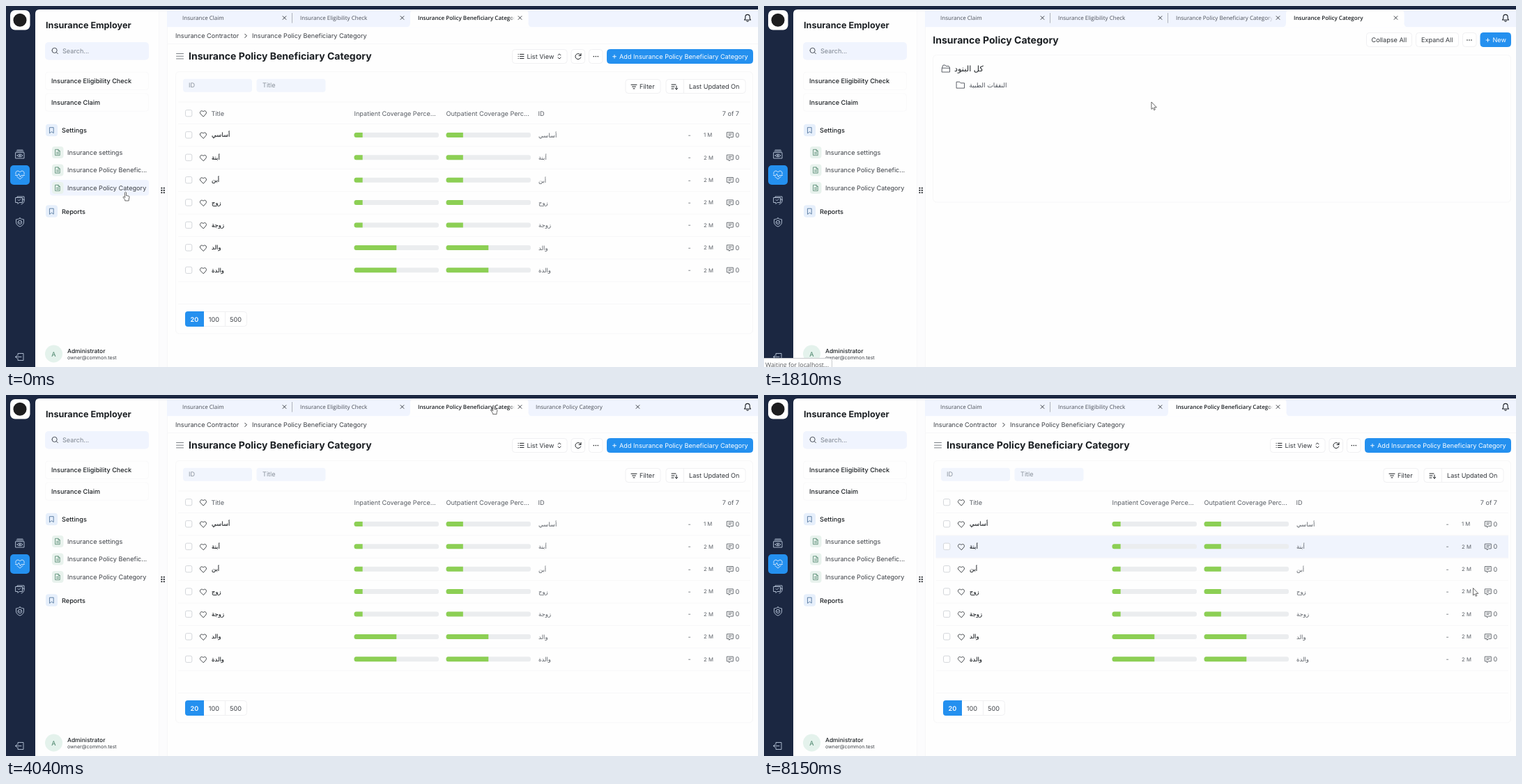
These frames come from a looping animation (1079 by 519 pixels, 8200 ms). An HTML page:

```html
<!DOCTYPE html>
<html lang="en">
<head>
<meta charset="utf-8">
<title>Insurance categories</title>
<style>
  html, body { margin: 0; width: 100%; height: 100%; overflow: hidden; background: #fefefe; }
  svg { display: block; width: 100%; height: 100%; }
  text { font-family: Inter, sans-serif; text-rendering: geometricPrecision; white-space: pre; }
  .ui { font-family: "Open Sans", "Noto Sans", sans-serif; }
  .ar { font-family: "DejaVu Sans", sans-serif; }
</style>
</head>
<body>
<svg id="stage" viewBox="0 0 1079 519" xmlns="http://www.w3.org/2000/svg"></svg>
<script>
const LOOP = 8200, TAB_X = 242, TAB_W = 169;
const INK = '#1c2024', GREY = '#5a5f66', BLUE = '#2490ef', PALE = '#f0f4fe', NAVY = '#1b2741';
const LINE = '#f7f7f8', EDGE = '#f0f0f2';

// Drawing helpers; text is placed by its left edge and the middle of its capitals.
const text = (x, y, str, { size = 9.13, fill = INK, more = '' } = {}) =>
  `<text x="${x}" y="${(y + size * 0.364).toFixed(2)}" font-size="${size}" fill="${fill}" ${more}>${str}</text>`;
const rect = (x, y, w, h, r, fill, stroke = 'none') =>
  `<rect x="${x}" y="${y}" width="${w}" height="${h}" rx="${r}" fill="${fill}" stroke="${stroke}"/>`;
const icon = (x, y, d, stroke = GREY, width = 0.9, fill = 'none') =>
  `<path transform="translate(${x} ${y})" d="${d}" fill="${fill}" stroke="${stroke}" stroke-width="${width}" stroke-linecap="round" stroke-linejoin="round"/>`;
const rule = (x, y, w) => rect(x, y, w, 1, 0, LINE);
const group = (id, body) => `<g id="${id}">${body}</g>`;
const bold = 'font-weight="700"', semi = 'font-weight="600"', medium = 'font-weight="500"', arabic = 'class="ar"';

const ICONS = {
  heart: 'M0 4.5L-4 .5C-6-2-2.5-5.5 0-2.5C2.5-5.5 6-2 4 .5Z',
  file: 'M-3-4.2H1L3.2-2V4.2H-3ZM1-4.2V-2H3.2M-1.4 0H1.6M-1.4 2H1.6',
  bookmark: 'M-2.7-4H2.7V4L0 2L-2.7 4Z',
  comment: 'M-4.3-4H4.3V2.8H.8L-1.6 4.6V2.8H-4.3ZM-2.2-1.7H2.2M-2.2.4H.8',
  cross: 'M-2.4-2.4L2.4 2.4M2.4-2.4L-2.4 2.4',
  plus: 'M-2.4 0H2.4M0-2.4V2.4',
  shield: 'M0-6C2-4.5 4-4.2 5.5-4.2V0C5.5 3 3 5 0 6.2C-3 5-5.5 3-5.5 0V-4.2C-4-4.2-2-4.5 0-6Z'
};

function button(x, y, w, str, tx, blue) {
  const fill = blue ? '#fff' : '#33373c';
  return rect(x + .5, y + .5, w - 1, 20, 4, blue ? BLUE : '#fff', blue ? BLUE : EDGE) +
    text(tx, y + 10.6, str, { fill, more: 'font-weight="420"' });
}
const dots = (x, y) => [-3, 0, 3].map(d => `<circle cx="${x + d}" cy="${y}" r=".8" fill="${INK}"/>`).join('');

function rail() {
  const pale = '#b9c7da';
  return rect(0, 0, 1079, 5, 0, NAVY) + rect(0, 0, 52, 519, 0, NAVY) +
    `<path d="M42 519V11Q42 5 48 5H219V519Z" fill="#fefefe"/>` +
    rect(6, 6, 28.5, 28.5, 7, '#fff') + '<circle cx="20" cy="20.3" r="9.5" fill="#1d1d1f"/>' +
    rect(6, 229, 28, 28, 5, BLUE) +
    icon(20, 213, 'M-4-6H4M-5-4.2H5M-6-2.3H6V6H-6ZM-4 2Q0-2 4 2Q0 6-4 2ZM-1 2a1 1 0 1 0 2 0a1 1 0 1 0-2 0', pale) +
    icon(20, 243, 'M-6-1C-7.5-6-2-7.5 0-4C2-7.5 7.5-6 6-1M-4.5 2L0 6L4.5 2M-6.5.5H-3L-1.5-2L.5 3L2 .5H6.5', '#d8eafd') +
    icon(20, 279, 'M-4-3.5V-5H6V0M-6-3.5H3.5V3.5H-1L-3 5.5V3.5H-6ZM-3-.5L-1.5 1L1-1.5M3.5-1H6V1C6 3.5 4.5 5 2 6', pale) +
    icon(20, 311, ICONS.shield, pale) +
    icon(20, 311, 'M-2.8 0a2.8 2.8 0 1 0 5.6 0a2.8 2.8 0 1 0-5.6 0M-1.2 0L-.3.9L1.3-.8', pale) +
    icon(19.5, 504.5, 'M-2.5-2V-5H5.5V5H-2.5V2M2.5 0H-6M-4-2L-6 0L-4 2', pale);
}

function sidebar() {
  const head = (y, str) => rect(57, y - 9, 17, 17.5, 4, '#e6effb') +
    icon(65.5, y, ICONS.bookmark, '#54779d') + text(80, y, str, { more: medium });
  const item = (y, str) => rect(66, y - 8.5, 16.5, 17, 4, '#e8f2ed') +
    icon(74, y, ICONS.file, '#5f917a') + text(88, y, str, { fill: '#3d4147' });
  const card = (y, str) => rect(56.5, y - 12.5, 148, 25.5, 4, '#fefefe', '#f9f9fa') +
    text(65, y, str, { more: medium });
  const grip = [223.4, 226.8].map(x => [261.7, 265, 268.3].map(y =>
    rect(x - 1, y - 1, 2, 2, .6, '#25282c')).join('')).join('');
  return text(57, 27.3, 'Insurance Employer', { size: 12.645, more: bold }) +
    rect(56, 52, 149, 25.5, 5, PALE) +
    icon(70, 64.5, 'M-4-.6a3.6 3.6 0 1 0 7.2 0a3.6 3.6 0 1 0-7.2 0M2.2 2L4.4 4.2', '#4b5058', 1) +
    text(81, 64.6, 'Search...', { fill: '#7d858f' }) +
    card(107.5, 'Insurance Eligibility Check') + card(138.3, 'Insurance Claim') +
    head(178.7, 'Settings') +
    group('itemHover', rect(63, 250, 142, 22.5, 4, PALE)) +
    item(210.5, 'Insurance settings') + item(236, 'Insurance Policy Benefic...') +
    item(261.5, 'Insurance Policy Category') + head(295.2, 'Reports') +
    '<circle cx="68.5" cy="500" r="12.5" fill="#e4f2ec"/>' +
    text(68.5, 500.2, 'A', { fill: '#478268', more: 'text-anchor="middle"' }) +
    text(88, 495.7, 'Administrator', { size: 8.43, more: medium }) +
    text(88, 505.6, 'owner@common.test', { size: 7.03, fill: '#3d4147' }) +
    rect(219, 5, 12, 514, 0, '#fcfcfd') + rect(219, 5, .7, 514, 0, '#f5f5f7') +
    rect(231, 30, .7, 489, 0, '#f3f3f5') + grip;
}

const tabNames = ['Insurance Claim', 'Insurance Eligibility Check',
  'Insurance Policy Beneficiary Category', 'Insurance Policy Category'];

function tabBar() {
  const shape = `M-6 25.5Q0 25.5 0 19.5V6Q0 .5 5.5 .5H${TAB_W - 5}Q${TAB_W + .5} .5 ${TAB_W + .5} 6V19.5Q${TAB_W + .5} 25.5 ${TAB_W + 6.5} 25.5Z`;
  const tab = (name, i) => group('tab' + i,
    `<path d="${shape}"/>` +
    `<g mask="url(#fade)">${text(11, 12, name, { size: 8.03, more: 'class="ui"' })}</g>` +
    icon(157.5, 12, ICONS.cross, '#3c4046', 1));
  const seps = [1, 2].map(i => group('sep' + i, rect(TAB_X + TAB_W * i - .9, 10, .9, 14.5, 0, '#a9adb5'))).join('');
  return `<defs>
    <linearGradient id="edge" gradientUnits="userSpaceOnUse" x1="142" x2="150"><stop stop-color="#fff"/><stop offset="1" stop-color="#000"/></linearGradient>
    <mask id="fade" maskUnits="userSpaceOnUse" x="0" y="0" width="160" height="26"><rect width="160" height="26" fill="url(#edge)"/></mask>
    <clipPath id="bar"><rect x="231" y="5" width="848" height="25.5"/></clipPath></defs>
    <g clip-path="url(#bar)">${rect(231, 5, 848, 25.5, 0, PALE)}${tabNames.map(tab).join('')}${seps}</g>` +
    icon(1064, 17, 'M-4.5 3H4.5L3.2 1V-1.2C3.2-5.8-3.2-5.8-3.2-1.2V1ZM-1.2 4.6Q0 5.8 1.2 4.6', INK, 1.1);
}

const people = ['أساسي', 'أبنة', 'أبن', 'زوج', 'زوجة', 'والد', 'والدة'];

function listRow(name, i) {
  const y = 185.4 + 32.4 * i;
  const bar = (x, part) => rect(x, y - 3.5, 121.5, 7, 3, '#ebedef') +
    `<path d="M${x + 121.5 * part} ${y - 3.5}H${x + 3}a3 3.5 0 0 0 0 7H${x + 121.5 * part}Z" fill="#8ccf54"/>`;
  return rect(257.5, y - 4.7, 9.3, 9.3, 2, '#fff', '#d3d6da') + icon(283, y + .3, ICONS.heart, '#33373c') +
    text(295, y, name, { size: 8.5, more: arabic + ` stroke="${INK}" stroke-width=".15"` }) +
    bar(499.5, i < 5 ? .1 : .5) + bar(631.5, i < 5 ? .2 : .5) +
    text(764, y + .4, name, { size: 8.5, fill: GREY, more: arabic }) +
    text(978.5, y, '-', { fill: GREY }) +
    text(1001, y, (i ? 2 : 1) + ' M', { size: 7.73, fill: GREY }) +
    icon(1039, y + .3, ICONS.comment) + text(1046.5, y, '0', { fill: GREY }) + rule(247, y + 16, 821);
}

function listPage() {
  const head = { fill: GREY }, hint = { fill: '#8a929c' };
  return text(243, 42.7, 'Insurance Contractor', { fill: '#3d4147' }) +
    icon(344, 42.9, 'M-1.2-2.6L1.4 0L-1.2 2.6', INK) +
    text(353, 42.7, 'Insurance Policy Beneficiary Category', { fill: '#3d4147' }) + rule(231, 54, 848) +
    icon(249.5, 72.2, 'M-5-3.7H5M-5 0H5M-5 3.7H5', '#6c7279') +
    text(262, 72.2, 'Insurance Policy Beneficiary Category', { size: 14.05, more: bold }) +
    button(726, 62, 79.5, 'List View', 747.5) +
    icon(739, 72.4, 'M-1.5-3H4M-1.5 0H4M-1.5 3H4M-4-3h.3M-4 0h.3M-4 3h.3', INK, 1) +
    icon(794, 72.4, 'M-2-1.6L0-3.6L2-1.6M-2 1.6L0 3.6L2 1.6', INK) +
    button(810.5, 62, 20.5, '', 0) + icon(821, 72.4, 'M3.8-1A4 4 0 1 0 3.7 1.6M4-4V-1H1', INK, 1) +
    button(836, 62, 20.5, '', 0) + dots(846.3, 72.6) +
    button(862, 62, 210, 'Add Insurance Policy Beneficiary Category', 880, true) +
    icon(873, 72.7, ICONS.plus, '#fff') +
    rect(243.5, 94.5, 828, 376.5, 5, '#fefefe', LINE) +
    rect(254, 104.7, 99, 19, 4, '#f1f5fd') + text(262, 114, 'ID', hint) +
    rect(359.5, 104.7, 99, 19, 4, '#f1f5fd') + text(368, 114, 'Title', hint) +
    button(888.5, 105, 51, 'Filter', 909) + icon(901, 116, 'M-4-2.8H4M-2.5 0H2.5M-1 2.8H1', INK, 1) +
    button(946.5, 105, 115, 'Last Updated On', 980) + rect(972, 105.5, 1, 20, 0, EDGE) +
    icon(959, 116, 'M-4-3H2M-4 0H0M-4 3H-1M3-1V4M1.2 2.3L3 4L4.8 2.3', INK, 1) +
    rule(247, 137.5, 821) +
    rect(257.5, 149.5, 9.3, 9.3, 2, '#fff', '#d3d6da') + icon(283, 154.4, ICONS.heart, '#33373c') +
    text(294.5, 154.2, 'Title', head) + text(499.5, 154.2, 'Inpatient Coverage Perce...', head) +
    text(631.5, 154.2, 'Outpatient Coverage Perc...', head) + text(763.5, 154.2, 'ID', head) +
    text(1052, 154.2, '7 of 7', { fill: GREY, more: 'text-anchor="end"' }) + rule(247, 169, 821) +
    group('rowHover', rect(246.5, 202, 821.5, 32, 0, '#f0f4fd')) +
    people.map(listRow).join('') + rule(247, 428, 821) +
    rect(257.5, 439.5, 88, 21, 4, '#fff', EDGE) + rect(314, 440, 1, 20, 0, EDGE) +
    `<path d="M284 439V461H261Q257 461 257 457V443Q257 439 261 439Z" fill="${BLUE}"/>` +
    text(264.6, 450.2, '20', { fill: '#fff', more: semi }) +
    text(290.7, 450.2, '100', { fill: '#3d4147' }) + text(321, 450.2, '500', { fill: '#3d4147' });
}

function treePage() {
  return text(242.3, 48.4, 'Insurance Policy Category', { size: 14.05, more: bold }) +
    button(864, 38, 66, 'Collapse All', 871.5) + button(935, 38, 62, 'Expand All', 943) +
    button(1002, 38, 20.5, '', 0) + dots(1012, 49) +
    button(1027.5, 38, 44.5, 'New', 1045.5, true) + icon(1038.5, 49, ICONS.plus, '#fff') +
    rect(242.5, 70.5, 829, 211.5, 5, '#fefefe', LINE) +
    icon(261, 90, 'M-5.5-1L-4-5H-1L0-3.6H4.2L5.5-1V5H-5.5ZM-5.5-.8H5.5', '#4b5058') +
    text(273, 89.8, 'كل البنود', { size: 11.3, more: arabic }) +
    icon(282, 113.6, 'M-5.5-4.5H-1.2L.2-2.8H5.5V4.5H-5.5Z', '#4b5058') +
    text(294.5, 113.8, 'النفقات الطبية', { size: 9, fill: '#4b5058', more: arabic });
}

const statusBubble = '<path d="M-1 506.5H94Q97.5 506.5 97.5 510V520H-1Z" fill="#fff" stroke="#c9cbce"/>' +
  text(2, 515.9, 'Waiting for localhost...', { size: 8.8, fill: '#55585c', more: 'class="ui"' });
const pointer = group('arrow', icon(0, 0, 'M0 0V10L2.3 8L3.8 11.3L5.4 10.6L4 7.4H7Z', '#444', .8, '#fff')) +
  group('hand', icon(0, 0, 'M-1 1Q0-.6 1 1V5.5L4.5 6.2Q5.8 6.6 5.5 8L4.7 11V13H-.8V11.5L-3.4 8.2Q-3.6 6.8-2.2 7.2L-1 8.2Z', '#444', .8, '#fff'));

document.getElementById('stage').innerHTML = rect(0, 0, 1079, 519, 0, '#fefefe') + rail() + sidebar() +
  tabBar() + group('list', listPage()) + group('tree', treePage()) +
  group('status', statusBubble) + group('cursor', pointer);

const el = id => document.getElementById(id);
const show = (id, on) => el(id).setAttribute('visibility', on ? 'inherit' : 'hidden');
const clamp = v => Math.min(1, Math.max(0, v));
const smooth = v => (v = clamp(v), v * v * (3 - 2 * v));

// Pointer tip: time, x, y
const path = [
  [0, 171.5, 267], [1200, 171.5, 267], [1420, 286.5, 261], [2010, 693, 76], [2080, 693, 76],
  [2630, 686, 15], [4039, 686, 15], [4040, 699, 14.5], [4450, 850, 60], [4860, 892, 16],
  [5190, 892, 16], [5500, 850, 58], [5940, 809, 29], [8069, 809, 29], [8070, 955, 213],
  [8149, 955, 213], [8150, 1017.5, 278], [LOOP, 1017.5, 278]
];

function tipAt(t) {
  const i = path.findIndex(p => p[0] > t);
  const [t0, x0, y0] = path[i - 1], [t1, x1, y1] = path[i];
  const k = (t - t0) / (t1 - t0);
  return [x0 + (x1 - x0) * k, y0 + (y1 - y0) * k];
}

function draw(t) {
  const opened = t >= 650 && t < 5230;
  const active = t >= 650 && t < 3090 ? 3 : 2;
  const [x, y] = tipAt(t);
  const over = y < 30 ? Math.floor((x - TAB_X) / TAB_W) : -1;
  const onTab = over >= 0 && over < (opened ? 4 : 3);
  const onItem = x < 205 && y > 250 && y < 272.5;

  tabNames.forEach((_, i) => {
    const tab = el('tab' + i), on = i === active, label = tab.querySelector('text');
    const drop = i === 3 ? 7 * (1 - smooth((t - 700) / 130)) : 0;
    tab.setAttribute('transform', `translate(${TAB_X + TAB_W * i} ${5 + drop})`);
    tab.firstChild.setAttribute('fill', on ? '#fefefe' : onTab && i === over ? '#f7f9fe' : 'none');
    label.setAttribute('font-weight', on ? 600 : 400);
    label.setAttribute('fill', on ? INK : '#4a4f57');
  });
  show('tab3', opened);
  show('sep2', active === 3 && !(onTab && over === 2));
  show('list', active === 2);
  show('tree', active === 3 && t >= 1800);
  show('itemHover', onItem);
  show('rowHover', t >= 8070);
  el('status').setAttribute('opacity', clamp((t - 710) / 180) * clamp((2000 - t) / 120));

  el('cursor').setAttribute('transform', `translate(${x} ${y})`);
  show('hand', onTab || onItem);
  show('arrow', !onTab && !onItem);
}

function tick() {
  draw(performance.now() % LOOP);
  requestAnimationFrame(tick);
}
tick();
</script>
</body>
</html>
```
